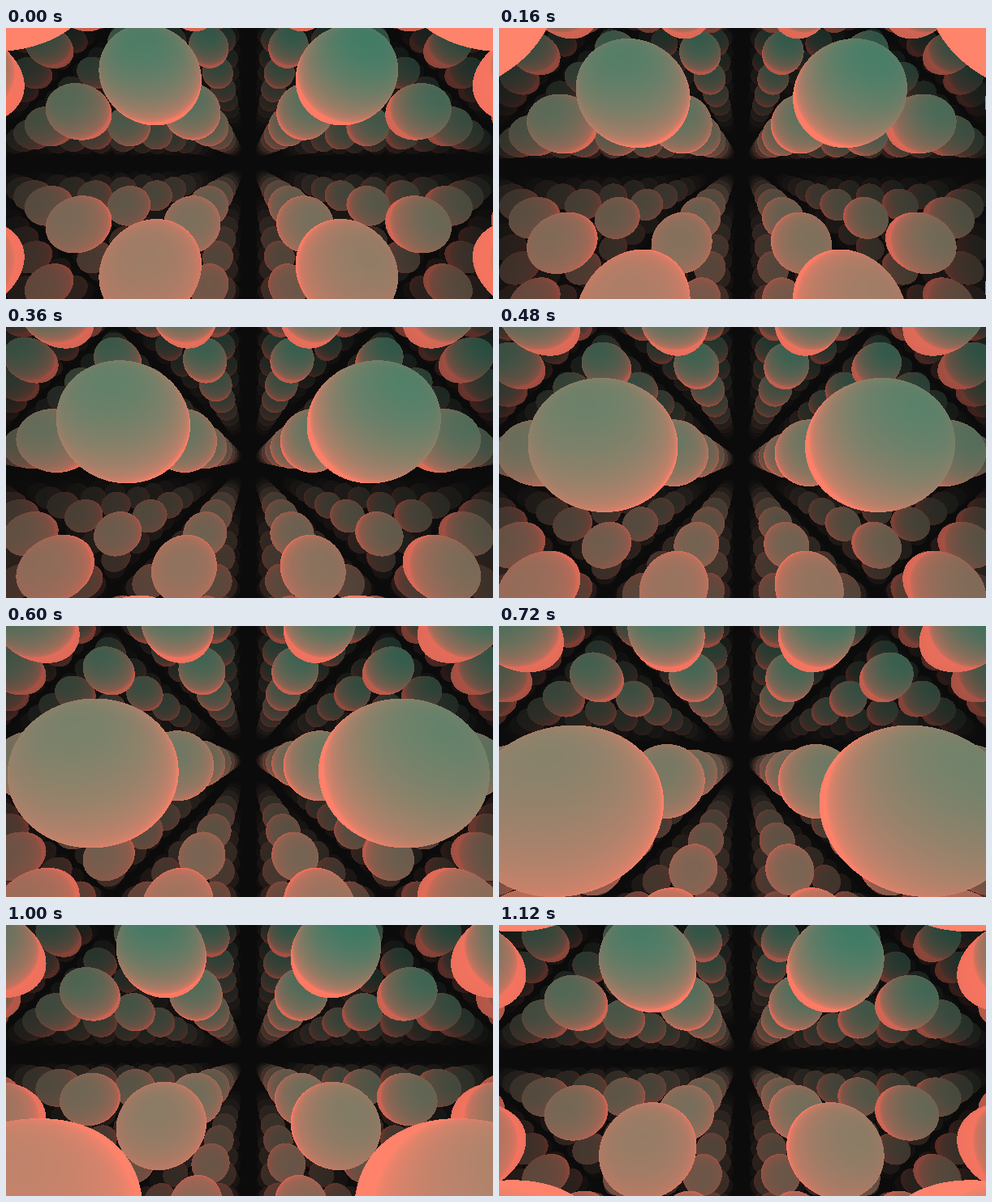
Animation, 600 px wide and 335 px high, one loop 1160 ms. Source, as an HTML page with a canvas:

```html
<!DOCTYPE html>
<html>
<head>
<meta charset="utf-8">
<title>Sphere lattice</title>
<style>
html, body { margin: 0; width: 100%; height: 100%; overflow: hidden; background: #0b0b0b; }
canvas { display: block; width: 600px; height: 335px; }
</style>
</head>
<body>
<canvas id="stage" width="600" height="335"></canvas>
<script>
const W = 600, H = 335, FOCAL = 335, CX = 298.8, CY = 165;
const STEP = 40, COUNT = 29, RADIUS = 0.25, FAR = 10.5, BACK = 11;
const LIGHT = { x: 0.1, y: -0.2, z: -0.97 };
const ctx = document.getElementById('stage').getContext('2d');
const cache = [];

const wrap = v => v - Math.floor(v);

// Cells crossed after k steps, slightly accelerating.
const travel = k => k / 32 * (1 + k / 400);

function render(k) {
  const p = travel(k);
  const z0 = wrap(1.427 - p), y0 = wrap(-0.442 + p);
  const img = ctx.createImageData(W, H), out = img.data;
  const r2 = RADIUS * RADIUS;
  let o = 0;

  for (let py = 0; py < H; py++) {
    const sy = (py + 0.5 - CY) / FOCAL;
    for (let px = 0; px < W; px++, o += 4) {
      const sx = (px + 0.5 - CX) / FOCAL;
      const a = sx * sx + sy * sy + 1;
      let r = BACK, g = BACK, b = BACK;

      // One candidate sphere per depth layer, nearest layer first.
      for (let cz = z0; cz < FAR; cz++) {
        const cx = Math.floor(sx * cz) + 0.5;
        const cy = Math.round(sy * cz - y0) + y0;
        const m = sx * cx + sy * cy + cz;
        const disc = m * m - a * (cx * cx + cy * cy + cz * cz - r2);
        if (disc < 0) continue;
        const t = (m - Math.sqrt(disc)) / a;
        if (t <= 0) continue;

        const lit = ((sx * t - cx) * LIGHT.x + (sy * t - cy) * LIGHT.y + (t - cz) * LIGHT.z) / RADIUS;
        const cool = Math.pow(Math.max(lit, 0), 0.47) * (160 - 105 * sy + 15 * sx);
        const fog = Math.exp(-0.038 * t * t * a);
        const shade = c => BACK + (c - BACK) * fog;
        r = shade(282 - cool);
        g = shade(133);
        b = shade(109);
        break;
      }
      out[o] = r;
      out[o + 1] = g;
      out[o + 2] = b;
      out[o + 3] = 255;
    }
  }
  return img;
}

let shown = -1;
const start = performance.now();

function draw(now) {
  const k = Math.floor(Math.max(0, now - start) / STEP) % COUNT;
  if (k !== shown) {
    cache[k] = cache[k] || render(k);
    ctx.putImageData(cache[k], 0, 0);
    shown = k;
  }
  requestAnimationFrame(draw);
}
draw(start);
</script>
</body>
</html>
```
